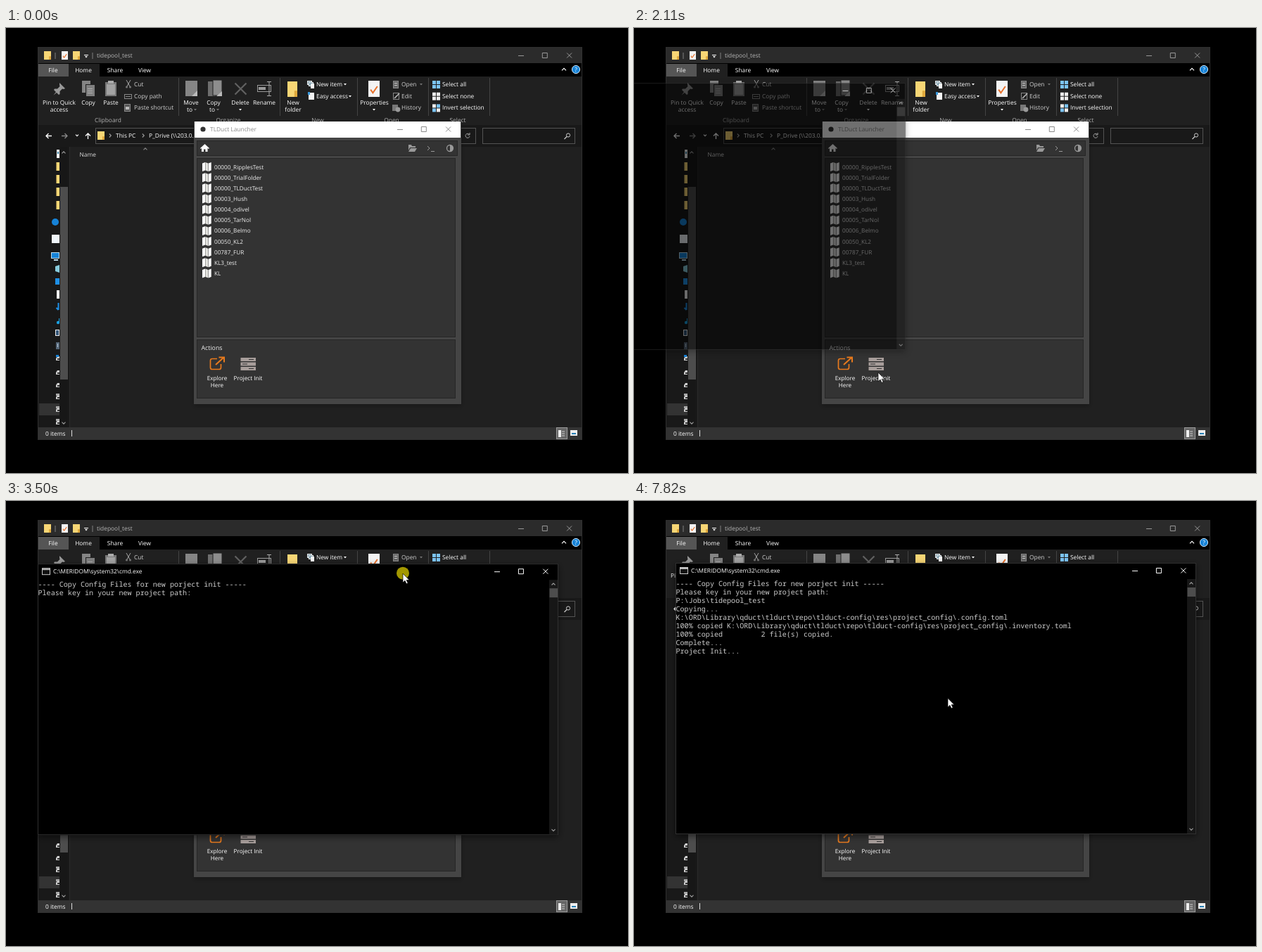
Animation of 884x633 px, one loop 8 s. Source, as an HTML page:

```html
<!DOCTYPE html>
<html lang="en">
<head>
<meta charset="utf-8">
<title>Project setup</title>
<style>
html, body { margin: 0; width: 100%; height: 100%; overflow: hidden; background: #000; }
svg { display: block; width: 884px; height: 633px; }
text { font: 8.4px "Open Sans", "Noto Sans", sans-serif; white-space: pre; text-rendering: geometricPrecision; }
.small text { font-size: 8.2px; }
.mono { font: 10.08px "Noto Sans Mono", "DejaVu Sans Mono", monospace; }
</style>
</head>
<body>
<svg id="stage" viewBox="0 0 884 633" xmlns="http://www.w3.org/2000/svg"></svg>
<script>
const LOOP = 8000;
const ROW = 12.08, COL = 6.05;
const WHITE = '#fff', DIM = '#a0a0a0', GOLD = '#f7d675';

const rect = (x, y, w, h, fill, more = '') =>
  `<rect x="${x}" y="${y}" width="${w}" height="${h}" fill="${fill}" ${more}/>`;
const box = (x, y, w, h, stroke, fill = 'none') =>
  rect(x + .5, y + .5, w - 1, h - 1, fill, `stroke="${stroke}"`);
const line = (d, stroke, width = 1) =>
  `<path d="${d}" fill="none" stroke="${stroke}" stroke-width="${width}"/>`;
const shape = (d, fill) => `<path d="${d}" fill="${fill}"/>`;
const disc = (x, y, r, fill, more = '') => `<circle cx="${x}" cy="${y}" r="${r}" fill="${fill}" ${more}/>`;
// y is the middle of the text line
const text = (x, y, str, fill = WHITE, more = '') =>
  `<text x="${x}" y="${y + 3}" fill="${fill}" ${more}>${str}</text>`;
const mid = (x, y, str, fill) => text(x, y, str, fill, 'text-anchor="middle"');
const chevron = (x, y, dir, color = DIM, s = 2.5) => line({
  up: `M${x - s} ${y + 1.3}l${s} -${s} ${s} ${s}`,
  down: `M${x - s} ${y - 1.3}l${s} ${s} ${s} -${s}`,
  right: `M${x - 1.2} ${y - s}l${s} ${s} -${s} ${s}`
}[dir], color, 1.1);
const caret = (x, y, fill = WHITE) => shape(`M${x - 2} ${y - 1}h4l-2 2.4z`, fill);
const folder = (x, y, w = 10, h = 12) =>
  rect(x, y, w, h, GOLD) + shape(`M${x + w * .7} ${y + h}v-${h * .4}h${w * .3}v${h * .4}z`, '#e0a93c');
const page = (x, y, w, h, fill = '#f4f4f4') => rect(x, y, w, h, fill);
const checkPage = (x, y, w, h) => page(x, y, w, h) +
  line(`M${x + w * .2} ${y + h * .55}l${w * .2} ${h * .2} ${w * .4} -${h * .4}`, '#e8702a', w / 8);
const windowButtons = (x, y, gap) =>
  `<path d="M${x} ${y + .5}h8M${x + gap} ${y - 3.5}h7v7h-7zM${x + 2 * gap + .5} ${y - 3.5}l7 7m0 -7l-7 7" fill="none" stroke="currentColor"/>`;

function explorer() {
  let s = rect(46, 27, 773, 559, '#202020') + rect(46, 27, 773, 23, '#2b2b2b') + rect(46, 50, 773, 19, '#000');

  // title bar and tabs
  s += folder(54, 33) + rect(69, 35, 2, 9, '#555') + checkPage(79, 33, 9, 12) + folder(95, 33) +
    line('M111 38.5h6', WHITE) + caret(114, 41) + rect(122, 35, 2, 9, '#555') +
    text(129, 39, 'tidepool_test', '#b5b5b5') + `<g color="#999">${windowButtons(728, 39, 34.3)}</g>`;
  s += rect(46, 51, 43, 18, '#555') + rect(89, 51, 44, 18, '#202020');
  [['File', 67], ['Home', 110], ['Share', 155], ['View', 197]].forEach(([n, x]) => s += mid(x, 60, n));
  s += chevron(793, 59, 'up', WHITE, 3) + disc(810, 59, 5.6, '#1683d8', 'stroke="#cfe6f7"') + mid(810, 59, '?');

  // ribbon
  [245, 389, 499, 600, 687].forEach(x => s += rect(x, 71, 1, 54, '#444'));
  [['Clipboard', 145], ['Organize', 316], ['New', 443], ['Open', 548], ['Select', 642]]
    .forEach(([n, x]) => s += mid(x, 131, n, '#b0b0b0'));
  [['Pin to Quick', 75.5, 106], ['access', 75.5, 116], ['Copy', 117, 106], ['Paste', 149, 106],
   ['Move', 263, 106], ['to', 261, 116], ['Copy', 295, 106], ['to', 293, 116], ['Delete', 333, 106],
   ['Rename', 367, 106], ['New', 408, 106], ['folder', 408, 116], ['Properties', 523.5, 106]]
    .forEach(([n, x, y]) => s += mid(x, y, n));
  [[269, 116], [301, 116], [590, 80]].forEach(([x, y]) => s += caret(x, y, '#777'));
  [[333, 116], [523, 116], [482, 80], [489, 97]].forEach(([x, y]) => s += caret(x, y));
  s += shape('M76 78l8 8-2 1-2-.5-3.500 3.500 0 4-1.500 1-3-3-4.500 3.500 3.500-4.500-3-3 1-1.500h4l3.500-3.500-.5-2z', '#999');
  s += rect(108, 75, 12, 17, '#858585') + rect(113.500, 80.500, 13, 17, '#808080', 'stroke="#202020"') +
    line('M116 86.500h7m-7 3h7m-7 3h7', '#b0b0b0');
  s += rect(141, 77, 16, 20, '#777') + rect(145, 75, 8, 4, '#aaa') + rect(143, 80, 12, 15, '#a2a2a2');
  s += line('M171 74l5 9m1 -9l-5 9', DIM) + disc(171.5, 84, 1.5, '#777') + disc(176.5, 84, 1.5, '#777');
  s += text(182, 80, 'Cut', '#d0d0d0') + box(168, 94, 11, 7, '#888') + line('M170 97.5h7', '#888') +
    text(182, 97, 'Copy path', '#d0d0d0');
  s += box(168, 108, 9, 11, '#888', '#555') + rect(170, 112, 5, 4, '#bbb') + text(182, 113, 'Paste shortcut', '#d0d0d0');
  s += rect(255, 75, 17, 22, '#858585') + shape('M264 97l8-8v8z', '#bbb');
  s += rect(287, 76, 11, 21, '#6e6e6e') + rect(294, 74, 13, 22, '#8d8d8d', 'stroke="#202020"') + shape('M299 97l8-7v7z', '#bbb');
  s += line('M325.500 78.500l16 16m0 -16l-16 16', '#616161', 2.2);
  s += box(357, 81, 20, 10, '#999') + rect(359, 84, 10, 4, '#999') + line('M371 76.500h6m-3 0v20m-3 0h6', '#aaa');
  s += folder(400, 76, 14, 22);
  s += box(428, 75, 7, 6, '#eee', '#79a') + box(430, 77, 7, 6, '#eee', '#79a') + page(433, 79, 5, 7) + text(441, 80, 'New item');
  s += page(430, 92, 8, 10) + rect(429, 91, 3, 4, '#3a9be0') + text(441, 97, 'Easy access');
  s += checkPage(515, 75, 16, 23);
  s += box(550, 75, 8, 11, '#888', '#666') + line('M552 78.500h4m-4 3h4', '#ccc') + text(562, 80, 'Open', '#d0d0d0');
  s += box(550, 92, 9, 10, '#888') + line('M552 100l7 -7', '#bbb', 1.6) + text(562, 97, 'Edit', '#d0d0d0');
  s += rect(549, 109, 8, 9, '#777') + disc(557, 116, 3.4, '#999') + text(562, 113, 'History', '#d0d0d0');
  ['Select all', 'Select none', 'Invert selection'].forEach((n, row) => {
    for (let i = 0; i < 4; i++) {
      const blue = row == 0 || (row == 2 && (i == 1 || i == 2));
      s += rect(606 + i % 2 * 6, 75 + row * 16.7 + (i >> 1) * 6, 5, 5, blue ? '#7cc4f5' : '#eee');
    }
    s += text(620, 80 + row * 16.7, n);
  });

  // address row
  s += rect(46, 138, 773, 31, '#191919') + box(127, 142, 541, 23, '#535353') + box(677, 142, 132, 23, '#535353');
  s += line('M65 153.5h-8m3.5 -3.5l-3.5 3.5 3.5 3.5', WHITE, 1.3) + line('M79 153.5h8m-3.5 -3.5l3.5 3.5 -3.5 3.5', '#888', 1.3) +
    chevron(101, 153, 'down', WHITE, 2) + line('M116.5 158v-8m-3.5 3.5l3.5 -3.5 3.5 3.5', WHITE, 1.3) + folder(130, 147);
  s += chevron(148, 153, 'right') + text(156, 153, 'This PC') + chevron(195, 153, 'right') + text(203, 153, 'P_Drive (\\\\203.0.1');
  s += line('M658.5 151.5a3 3 0 1 0 0.5 2.5M659 149v3h-3', DIM) +
    disc(799, 152.5, 2.6, 'none', 'stroke="#ccc"') + line('M797 154.500l-3.500 3.500', '#ccc', 1.2);

  // navigation pane
  s += rect(46, 169, 44, 399, '#191919') + rect(90, 169, 1, 399, '#2b2b2b') + rect(47, 534, 29, 17, '#333');
  s += rect(77, 169, 11, 399, '#171717') + rect(77, 226, 11, 274, '#4d4d4d') +
    chevron(82, 177, 'up') + chevron(82, 562, 'down');
  s += page(72, 173, 4, 12) + rect(73, 176, 2, 3, '#48a');
  [197, 215, 233, 252].forEach(y => s += rect(71.5, y - 6, 4.5, 12, GOLD));
  s += disc(70, 276, 5, '#1683d8') + rect(65, 294, 11, 12, '#f0f6fa');
  s += box(64, 319, 12, 9, '#bde', '#1683d8') + rect(68, 329, 6, 2, '#bde');
  s += shape('M70 339l6-2v11l-6-2z', '#8cd') + rect(70, 356, 6, 9, '#1e90e8') + page(72, 373, 4, 12) +
    line('M74.5 391v10m-3 -3l3 3', '#1e90e8', 2) + disc(74, 419, 2.2, '#1aa0e0') + line('M75.500 413v6', '#1aa0e0') +
    box(70, 429, 6, 9, '#eee', '#357') + rect(71, 447, 5, 10, '#567') + rect(73, 449, 1, 5, '#bcd');
  [470, 490, 508, 525, 543, 561].forEach((y, i) => {
    s += shape(`M71 ${y}l2-3h3v6h-5z`, '#ccc') + rect(73, y, 3, 2, '#333');
    if (i > 2) s += rect(71, y - 5, 5, 3, '#aaa');
    if (!i) s += rect(71, y - 5, 4, 3, '#1683d8');
  });

  // content and status bar
  s += text(104.5, 180, 'Name', '#ddd') + chevron(198, 172, 'up', '#888');
  s += rect(46, 568, 773, 18, '#333') + text(56, 577, '0 items') + rect(93, 572, 1, 9, '#ddd');
  s += box(782, 568, 16, 17, '#999', '#666') + rect(785, 572, 4, 10, '#eee') + line('M790 574h4m-4 3h4m-4 3h4', '#ccc') +
    rect(802, 572, 10, 8, '#eee') + rect(804, 576, 6, 2, '#267fb5');
  return s + box(45, 27, 774, 559, '#303030');
}

function launcher() {
  const names = ['00000_RipplesTest', '00000_TrialFolder', '00000_TLDuctTest', '00003_Hush', '00004_odivel',
    '00005_TarNol', '00006_Belmo', '00050_KL2', '00787_FUR', 'KL3_test', 'KL'];
  let s = rect(267, 133, 380, 402, '#444', 'filter="url(#faint)"') + rect(268, 133, 378, 23, '#fff');
  s += disc(280, 144, 3.6, '#333') + '<g id="caption">' + text(290, 144, 'TLDuct Launcher', 'currentColor') +
    windowButtons(556, 144, 34.300) + '</g>';
  [[160, 22, 371], [185, 255, 368], [443, 84, 368]].forEach(([y, h, w]) => s += box(271, y, w, h, '#262626', '#333'));
  s += shape('M276 171l6.500-6 6.500 6-1 1-1.500-1v5h-3v-3.500h-2.500v3.500h-3v-5l-1.500 1z', '#fff');
  s += shape('M572 166h4l1 2h5v2h-8l-2 4zM575 171h9l-3 5h-9z', '#999') +
    line('M599 168l3 3-3 3M604 175.500h5', '#999') +
    disc(631, 171, 4.5, 'none', 'stroke="#999" stroke-width="1.300"') + shape('M631 166.500a4.500 4.500 0 0 1 0 9z', '#999');
  s += '<g class="small">';
  names.forEach((n, i) => {
    const y = 197.5 + i * 15.15, top = y - 5;
    s += shape(`M279 ${top}l4-1.500v11.500l-4 1.500zM287.700 ${top}l4-1.500v11.500l-4 1.500z`, '#fff') +
      shape(`M283.400 ${top - 1.5}l3.900 1.500v11.500l-3.900-1.500z`, '#e4e4e0');
    s += text(296, y, n, '#f0f0f0');
  });
  [['Explore', 300, 497.5], ['Here', 300, 507.5], ['Project Init', 344, 497.5]].forEach(([n, x, y]) => s += mid(x, y, n));
  s += '</g>' + text(277.5, 455, 'Actions', '#f0f0f0', 'style="font-size:8.8px"');
  s += line('M300 470.500h-7q-2.500 0-2.500 2.500v10q0 2.500 2.500 2.500h10q2.500 0 2.500-2.500v-5', '#e87a1d', 1.7) +
    line('M298 479l11-10m-6.500 -.5h7.500v7', '#e87a1d', 2);
  for (let i = 0; i < 3; i++) {
    const y = 469 + i * 6.5;
    s += rect(333.500, y, 21.500, 5, '#a89e9b') + rect(i == 1 ? 336 : 345, y + 2, 7, 1, '#333');
  }
  return s;
}

const cell = (col, row) => [.5 + col * COL, 23.5 + row * ROW];
const consoleLines = (rows, first) => rows.map((str, i) =>
  `<text class="mono" x="0.500" y="${32.6 + (first + i) * ROW}" fill="#ccc">${str}</text>`).join('');

function terminal() {
  const base = String.raw`K:\ORD\Library\qduct\tlduct\repo\tlduct-config\res\project_config` + '\\';
  return rect(0, 0, 740, 386, '#000', 'filter="url(#soft)"') + box(0, 0, 740, 386, '#303030', '#000') +
    box(6, 6, 12, 10, '#ccc', '#111') + rect(7, 7, 10, 2, '#bbb') +
    '<text id="heading" x="22" y="14" fill="#fff"></text>' +
    `<g color="#fff">${windowButtons(649, 11, 34.4)}</g>` +
    rect(727, 23, 12, 362, '#171717') + rect(727.500, 35, 11.500, 13, '#4d4d4d') +
    chevron(733, 29, 'up') + chevron(733, 379, 'down') +
    consoleLines(['---- Copy Config Files for new porject init -----', 'Please key in your new project path:'], 0) +
    '<g id="typed">' + consoleLines(['P:\\Jobs\\tidepool_test'], 2) + '</g>' +
    '<g id="output">' + consoleLines(['Copying...', base + '.config.toml',
      '100% copied ' + base + '.inventory.toml', '100% copied         2 file(s) copied.', 'Complete...', 'Project Init...'], 3) + '</g>' +
    `<rect id="block" x="${cell(55, 9)[0]}" y="${cell(55, 9)[1]}" width="${COL}" height="${ROW}" fill="#ccc"/>` +
    `<rect id="blink" width="${COL}" height="2.500" fill="#ccc"/>`;
}

const shadow = (id, blur, alpha) => `<filter id="${id}" x="-10%" y="-10%" width="120%" height="125%">` +
  `<feDropShadow dx="0" dy="3" stdDeviation="${blur}" flood-opacity="${alpha}"/></filter>`;

document.getElementById('stage').innerHTML =
  `<defs>${shadow('soft', 5, .5)}${shadow('faint', 3, .25)}</defs>` +
  explorer() + launcher() + `<g id="terminal">${terminal()}</g>` +
  '<circle id="press" r="9" fill="#ffee00" opacity="0.640"/>' +
  '<path id="pointer" d="M0 0v12.800l3-2.700 2 4.500 2.200-1-2-4.300h4z" fill="#fff" stroke="#000" stroke-width="0.700"/>';

const el = Object.fromEntries(['caption', 'terminal', 'heading', 'typed', 'output', 'block', 'blink', 'press', 'pointer']
  .map(id => [id, document.getElementById(id)]));

// start, end, number of steps, first point, last point
const glides = [
  [360, 680, 5, 581, 611, 369, 290],
  [850, 920, 2, 370, 390, 366, 475],
  [1090, 1160, 2, 352, 468, 339, 460],
  [1330, 1480, 3, 341, 468, 347, 490],
  [2400, 2720, 5, 335, 450, 171, 89],
  [2890, 3190, 5, 171, 89, 513, 105],
  [3265, 3650, 6, 540, 105, 580, 102],
  [3730, 3730, 1, 578, 102, 578, 102],
  [3880, 4270, 6, 572, 112, 466, 264],
  [4350, 4650, 5, 448, 258, 390.5, 225.5],
  [7210, 7360, 3, 408, 244, 446, 280.5]
];

function pointerAt(t) {
  const g = glides.filter(g => t >= g[0]).pop();
  if (!g) return null;
  const [t0, t1, n, x0, y0, x1, y1] = g;
  if (n < 2) return [x1, y1];
  const k = Math.min(1, Math.floor((t - t0) / (t1 - t0) * (n - 1) + .01) / (n - 1));
  return [x0 + (x1 - x0) * k, y0 + (y1 - y0) * k];
}

const within = (t, ...spans) => spans.some(([a, b]) => t >= a && t < b);
const show = (node, on) => node.setAttribute('display', on ? 'inline' : 'none');
const move = (node, x, y, more = '') => node.setAttribute('transform', `translate(${x} ${y})${more}`);

function draw(t) {
  const tip = pointerAt(t);
  show(el.pointer, tip);
  if (tip) {
    move(el.pointer, ...tip);
    move(el.press, tip[0], tip[1] - .5);
  }
  show(el.press, within(t, [1710, 1870], [2890, 3880], [6200, 6280]));
  el.caption.setAttribute('color', within(t, [1710, 2030]) ? '#000' : '#8a8a8a');

  show(el.terminal, t >= 2030);
  const [x, y] = t < 2890 ? [-348, 75] : t < 3880 ? [tip[0] - 519, tip[1] - 14] : [59, 88];
  const [scale, alpha] = t < 2110 ? [.95, .2] : t < 2170 ? [.984, .56] : t < 2250 ? [.995, .88] : [1, 1];
  move(el.terminal, x, y, ` translate(370 193) scale(${scale}) translate(-370 -193)`);
  el.terminal.setAttribute('opacity', alpha);

  const selecting = within(t, [4880, 5740]);
  el.heading.textContent = (selecting ? 'Select ' : '') + 'C:\\MERIDOM\\system32\\cmd.exe';
  show(el.block, selecting);
  show(el.typed, t >= 5820);
  show(el.output, t >= 6890);

  const [bx, by] = t < 5820 ? cell(0, 2) : t < 6890 ? cell(21, 2) : cell(0, 9);
  move(el.blink, bx, by + 8.7);
  show(el.blink, within(t, [3580, 4120], [4650, 5190], [5740, 6280], [6740, 7820]));
}

const begin = performance.now();
function tick() {
  draw((performance.now() - begin) % LOOP);
  requestAnimationFrame(tick);
}
tick();
</script>
</body>
</html>
```
